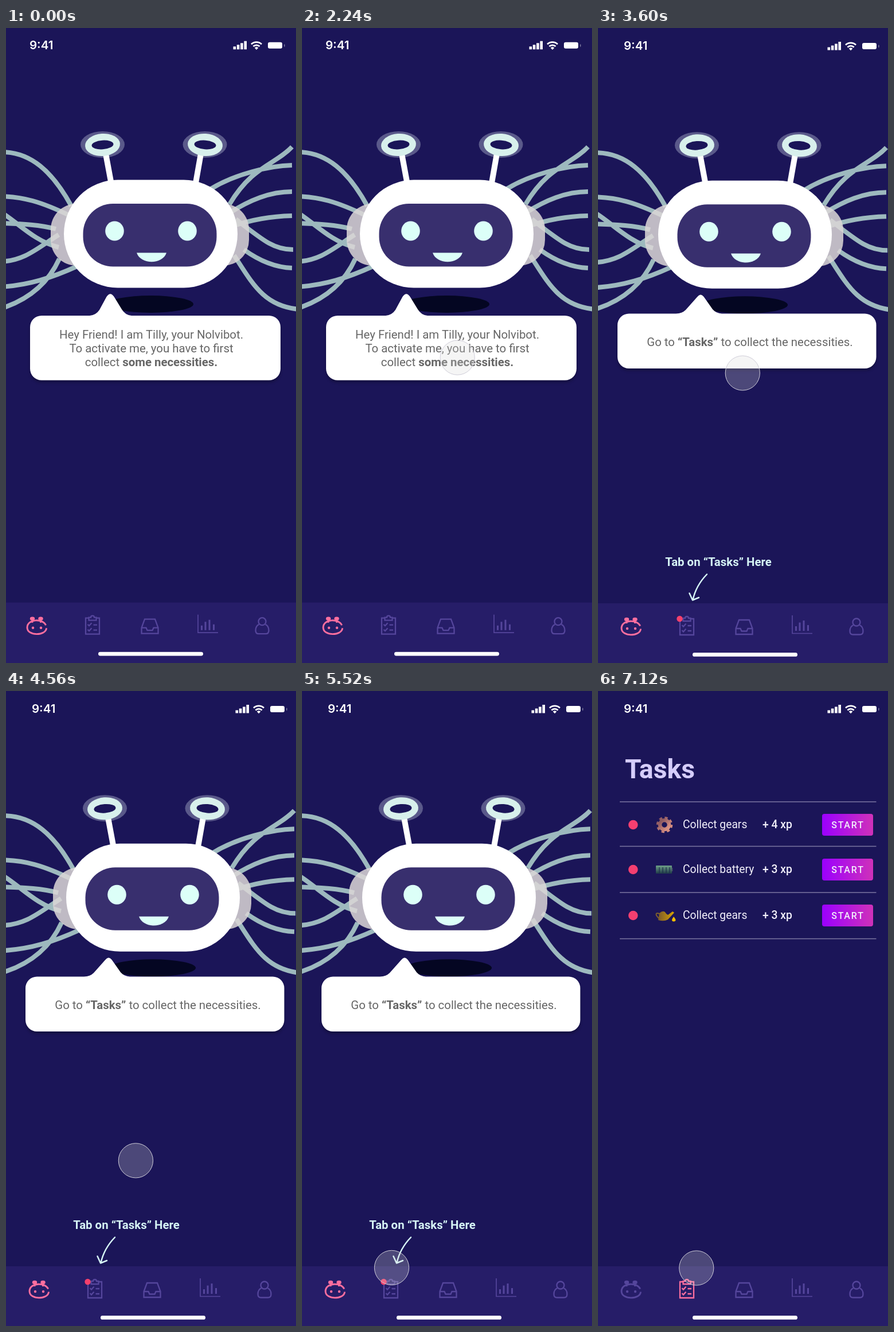
An HTML page that plays this animation: 506 by 1106 pixels, repeating every 8000 ms.

```html
<!DOCTYPE html>
<html lang="en">
<head>
<meta charset="utf-8">
<title>Robot tasks</title>
<style>
html, body { margin: 0; height: 100%; overflow: hidden; background: #1b1558; }
svg { display: block; width: 100vw; height: 100vh; font: 20.4px Roboto, sans-serif; }
.line { fill: none; stroke: currentColor; stroke-width: 2.3; }
.arms { fill: none; stroke: #9db9be; stroke-width: 8; }
.bubble { fill: #fff; filter: drop-shadow(0 4px 2px rgba(0, 0, 0, .25)); }
.say { fill: #666; text-anchor: middle; }
.b { font-weight: 700; }
.m { font-weight: 500; }
.icon { color: #55469c; }
.on { color: #ff6f9f; }
</style>
</head>
<body>
<svg viewBox="0 0 506 1106">
  <defs>
    <linearGradient id="button"><stop stop-color="#9b00ff"/><stop offset="1" stop-color="#cf31b9"/></linearGradient>
    <linearGradient id="copper" x2="1" y2="1"><stop stop-color="#80505c"/><stop offset="1" stop-color="#e69a88"/></linearGradient>
    <linearGradient id="gold"><stop stop-color="#7a5a2c"/><stop offset="1" stop-color="#d9a400"/></linearGradient>
    <linearGradient id="green" x2="0" y2="1"><stop stop-color="#6fa088"/><stop offset="1" stop-color="#1f3b48"/></linearGradient>
  </defs>
  <rect width="506" height="1106" fill="#1b1558"/>

  <g id="page">
    <g fill="#fff">
      <text x="45" y="38" style="font:600 20.5px Inter,sans-serif">9:41</text>
      <path d="M400.5 33.5h4.6v5h-4.6zM406.8 30.5h4.6v8h-4.6zM413.1 27.5h4.6v11h-4.6zM419.4 24h4.6v14.5h-4.6z"/>
      <path d="M432 29.5a13 13 0 0 1 18 0M435.4 33.4a8 8 0 0 1 11.2 0" fill="none" stroke="#fff" stroke-width="2.8"/>
      <path d="M441 39.2l-3.3-3.4a4.8 4.8 0 0 1 6.6 0z"/>
      <rect x="461" y="26" width="25" height="11" rx="3"/>
      <rect x="489" y="29.5" width="1.6" height="4.5" rx=".8" opacity=".4"/>
    </g>

    <g id="robot">
      <g transform="translate(4 1.3)">
        <path class="arms" d="M-10 216C43 215 81 250 114 310M-10 293C30 294 60 302 112 327M-10 320C20 338 50 372 92 382M-10 340C30 341 60 343 87 350M-10 407C33 405 54 384 92 360M-10 451C40 448 80 435 124 415M-10 489C35 475 72 448 93 402
          M499 207C470 238 430 240 390 307M499 239C460 240 400 254 356 281M499 285C460 285 425 300 390 322M499 327C460 328 430 334 395 345M501 386C468 386 450 371 401 333M499 418C470 417 440 404 415 386M512 490C450 485 430 445 398 396"/>
        <g fill="#dcd8d7" fill-opacity=".85">
          <rect x="78" y="306" width="100" height="108" rx="45"/>
          <rect x="324" y="306" width="100" height="108" rx="45"/>
        </g>
        <g fill="#5a598a">
          <ellipse cx="168.5" cy="203" rx="38.5" ry="23"/>
          <ellipse cx="347" cy="203" rx="38.5" ry="23"/>
        </g>
        <path d="M174 219L183.5 270M340 219L331 270" stroke="#fff" stroke-width="10"/>
        <g id="rings"></g>
        <ellipse cx="252" cy="481" rx="75" ry="15" fill="#040622"/>
        <rect x="101" y="264.5" width="303" height="188" rx="94" fill="#fff"/>
        <rect x="134.5" y="306" width="233" height="109.5" rx="52" fill="#382f6e"/>
        <g fill="#dcfff8">
          <ellipse cx="189.5" cy="353.5" rx="16.3" ry="17"/>
          <ellipse cx="316.5" cy="353.5" rx="16.3" ry="17"/>
          <path d="M228 391.5H280C273 412.5 235 412.5 228 391.5Z"/>
        </g>
      </g>
    </g>

    <g>
      <rect y="1002" width="520" height="110" fill="#261d68"/>
      <g id="home" class="icon">
        <path class="line" style="stroke-width:2.9" d="M73.5 1041.5C69 1029.500 41 1030 41 1045.500C41 1061 74 1060 74.500 1046.500M50 1031V1037M64.500 1031V1037"/>
        <g fill="currentColor">
          <ellipse cx="50" cy="1030" rx="4.2" ry="3.2"/><ellipse cx="64.5" cy="1030" rx="4.2" ry="3.2"/>
          <circle cx="51" cy="1046" r="2.2"/><circle cx="65" cy="1046" r="2.2"/>
        </g>
      </g>
      <g id="list" class="icon">
        <path class="line" d="M148 1029H143V1057H167V1029H162M148.5 1033V1028H152C152 1024 158 1024 158 1028H161.5V1033ZM146.5 1040l2.5 2.5 4.5-5M146.5 1049l2.5 2.5 4.5-5M156.5 1041H163M156.5 1050H163"/>
      </g>
      <g class="icon">
        <path class="line" d="M246 1031H264L269.5 1046V1056H240.5V1046ZM240.5 1046H248.5L250.5 1050.5H259.5L261.5 1046H269.5"/>
        <path class="line" style="stroke-width:1.7" d="M339 1023V1054.5H374"/>
        <path class="line" style="stroke-width:3" d="M345.5 1042V1050M352 1035.5V1050M359 1032V1050M366.5 1040V1050"/>
        <circle class="line" cx="451" cy="1035" r="6.5"/>
        <path class="line" d="M445.5 1040C441 1042 439.5 1046 439.5 1050.5Q439.5 1056.5 445 1056.5H457Q462.5 1056.5 462.5 1050.5C462.5 1046 461 1042 456.5 1040"/>
      </g>
      <rect x="165" y="1088" width="183" height="6.8" rx="3.4" fill="#fff"/>
    </g>
  </g>

  <g id="intro">
    <path class="bubble" d="M62 501H146Q157 500 163 491L175.5 468Q182 458.500 188.500 468L202 490Q208 500 219 501H459a20 20 0 0 1 20 20V593.500a20 20 0 0 1-20 20H62a20 20 0 0 1-20-20V521a20 20 0 0 1 20-20Z"/>
    <text class="say"><tspan x="253.5" y="541">Hey Friend! I am Tilly, your Nolvibot.</tspan><tspan x="253.5" y="565">To activate me, you have to first</tspan><tspan x="253.5" y="589">collect <tspan class="b">some necessities.</tspan></tspan></text>
  </g>

  <g id="hint">
    <path class="bubble" d="M54 497.5H136Q147 497 153 491L173.5 468Q179 461 184.5 468L200 490Q206 497 216 497.5H465.5a20 20 0 0 1 20 20V573a20 20 0 0 1-20 20H54a20 20 0 0 1-20-20V517.5a20 20 0 0 1 20-20Z"/>
    <text class="say" x="265" y="553.5">Go to <tspan class="b">“Tasks”</tspan> to collect the necessities.</text>
    <text class="b" x="210" y="936.5" fill="#d6f4f5" text-anchor="middle">Tab on “Tasks” Here</text>
    <path d="M190 951.5Q171 971 165.5 996M159.5 984.5L165 996.5L176 992" fill="none" stroke="#d6f4f5" stroke-width="2.5" stroke-linecap="round" stroke-linejoin="round"/>
    <circle cx="142.5" cy="1029" r="5.2" fill="#f5406c"/>
  </g>

  <g id="tasks">
    <text class="b" x="47" y="151.5" fill="#d5cdfb" font-size="46.3">Tasks</text>
    <path d="M38 193H485.5M38 270.5H485.5M38 351H485.5M38 431.5H485.5" stroke="#7b76a1" stroke-width="1.3"/>
    <g id="rows"></g>
  </g>

  <circle id="touch" r="30.1" fill="#d8d8d8" stroke="#cfcdd8" stroke-width="1"/>
</svg>
<script>
const $ = id => document.getElementById(id);
const show = (id, on) => $(id).style.display = on ? '' : 'none';

$('rings').innerHTML = [[168.5, -4], [347.5, 4]].map(([x, turn]) =>
  `<g transform="translate(${x} 203.5) rotate(${turn})"><ellipse rx="30.5" ry="19.5" fill="#d8f0ec"/>
   <ellipse rx="19" ry="7.8" fill="#1b1558"/></g>`).join('');

const gear = `<g fill="none" stroke="url(#copper)"><circle r="8" stroke-width="6.5"/>
  <circle r="12" stroke-width="4.5" stroke-dasharray="5 4.425"/></g>`;
const battery = `<rect x="-15" y="-7" width="28" height="14" rx="1" fill="url(#green)"/>
  <path d="M-9 -4V6M-3 -4V6M3 -4V6M9 -4V6" stroke="#1c2a4a" stroke-width="1.2"/>
  <path d="M13.5 -3V3" stroke="#47506a" stroke-width="1.5"/>`;
const can = `<path d="M-9 -4Q-1 -11 3 -3L6 -1L14 -7L17 -5L6 7Q-1 11 -11 8Z" fill="url(#gold)"/>
  <path d="M-9 -3Q-16 -6 -14 0L-10 5" fill="none" stroke="#80602c" stroke-width="2"/>
  <path d="M16 2Q23 10 16 10.5Q10 10 16 2Z" fill="#f2bd00"/>`;
const rows = [[233, 'gears', 4, gear], [311, 'battery', 3, battery], [391, 'gears', 3, can]];
$('rows').innerHTML = rows.map(([y, item, xp, icon]) => `<g transform="translate(0 ${y})" fill="#f1effa">
  <circle cx="61.3" r="8.3" fill="#f43f70"/>
  <g transform="translate(116 0)">${icon}</g>
  <text x="148" y="6" font-size="19.3">Collect ${item}</text>
  <text class="m" x="287" y="6" font-size="19.3">+ ${xp} xp</text>
  <rect x="391" y="-19" width="89" height="38" rx="4" fill="url(#button)"/>
  <text class="m" x="436" y="5.5" font-size="16" letter-spacing="1.8" text-anchor="middle">START</text></g>`).join('');

// Each move lists [ms, x, y]; the touch rests between moves.
const moves = [
  [[1300, 590, 415], [1360, 500, 459], [1440, 385, 525], [1540, 285, 588], [1640, 257, 602]],
  [[2080, 257, 602], [2160, 258, 588], [2240, 271, 574], [2350, 298, 601], [2460, 272, 630],
   [2560, 245, 612], [2640, 252.3, 601]],
  [[4360, 252.3, 601], [4560, 226.5, 817], [4780, 203, 966], [5000, 180, 1032], [5100, 164, 1046],
   [5200, 153, 1041], [5340, 147, 1025], [5560, 159, 1001], [5720, 170, 995], [5860, 175, 999], [6040, 171.8, 1005]]
];

function slope(p, i, k) {
  const a = p[i - 1], b = p[i + 1];
  return a && b ? (b[k] - a[k]) / (b[0] - a[0]) : 0;
}

function touchAt(t) {
  const p = moves.filter(m => m[0][0] <= t).pop();
  const i = p.findIndex(q => q[0] > t) - 1;
  if (i < 0) return p[p.length - 1].slice(1);
  const a = p[i], b = p[i + 1], d = b[0] - a[0], u = (t - a[0]) / d, v = 1 - u;
  return [1, 2].map(k => v * v * (1 + 2 * u) * a[k] + u * u * (3 - 2 * u) * b[k]
    + d * u * v * (v * slope(p, i, k) - u * slope(p, i + 1, k)));
}

function draw(now) {
  const t = now % 8000, second = t >= 3600, tasks = t >= 7120;
  $('page').setAttribute('transform', second ? '' : 'translate(-4 -1.3)');
  show('robot', !tasks);
  show('intro', !second);
  show('hint', second && !tasks);
  show('tasks', tasks);
  $('home').classList.toggle('on', !tasks);
  $('list').classList.toggle('on', tasks);
  show('touch', t >= 1360);
  if (t >= 1360) {
    const pressed = t >= 3400 && !second || t >= 6960 && !tasks;
    $('touch').setAttribute('transform', `translate(${touchAt(t)})`);
    $('touch').setAttribute('fill-opacity', pressed ? .42 : .26);
  }
  requestAnimationFrame(draw);
}
requestAnimationFrame(draw);
</script>
</body>
</html>
```
